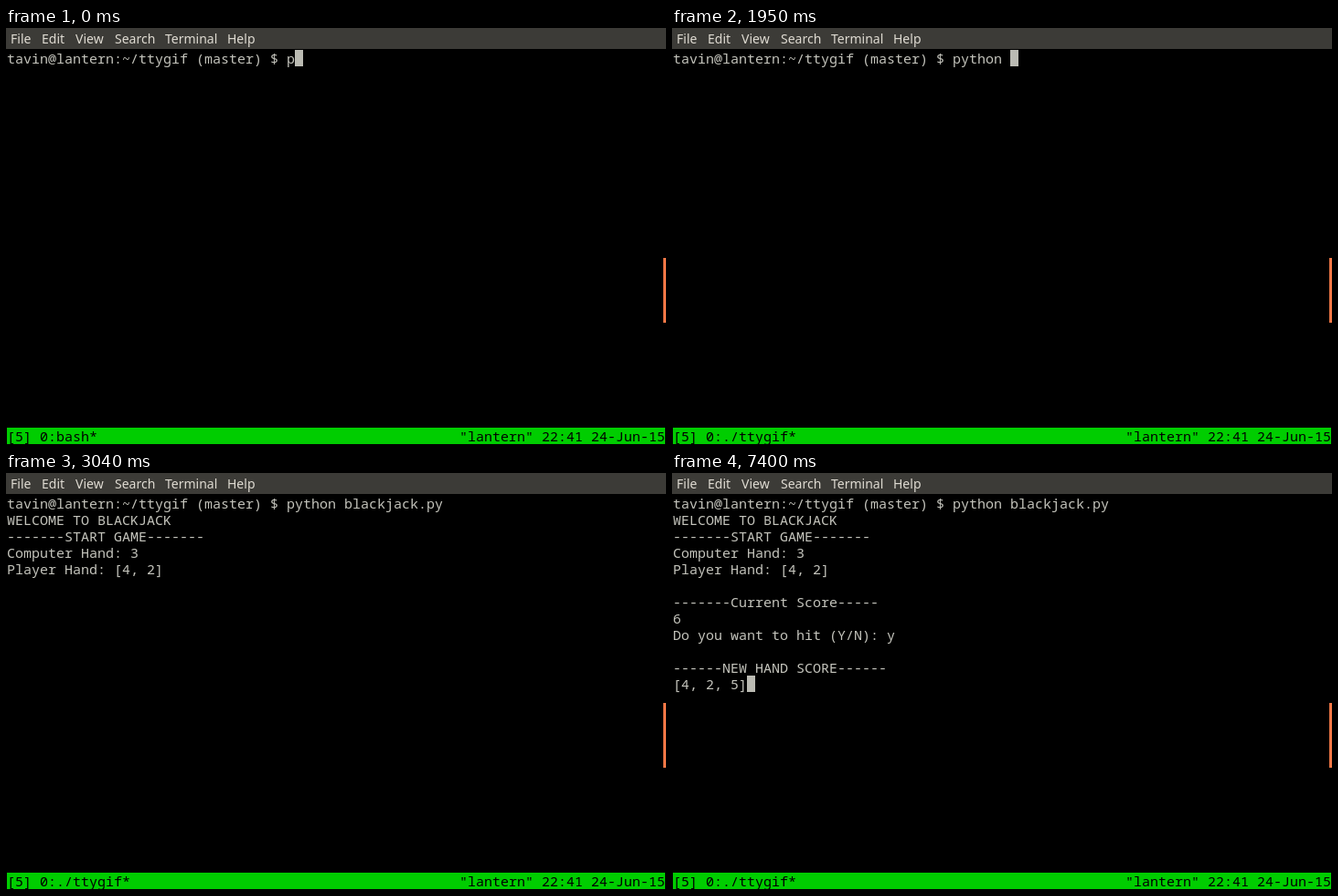
An HTML page that plays this animation: 722x457 px, repeating every 8000 ms.

```html
<!DOCTYPE html>
<html lang="en">
<head>
<meta charset="utf-8">
<title>Terminal session</title>
<style>
  html, body { margin: 0; width: 100%; height: 100%; overflow: hidden; background: #000; }
  #stage { position: relative; width: 722px; height: 457px; overflow: hidden; background: #000; }
  #stage * { position: absolute; top: 0; margin: 0; white-space: pre; }
  #stage #menu { width: 722px; height: 23px; background: #3c3b37; color: #dfdbd2;
                 font: 14px/23px "Noto Sans", "Open Sans", sans-serif; }
  .mono { font: 15px/18px "Noto Sans Mono", "DejaVu Sans Mono", monospace; }
  #stage #screen { left: 1px; top: 24px; color: #c4c4bc; }
  #stage #cursor { width: 9px; height: 18px; background: #bbbbb3; }
  #stage #status { left: 1px; top: 438px; width: 720px; height: 18px; background: #00cd00; color: #000; }
  #stage #clock { right: 0; }
  #stage #scrollbar { left: 719px; top: 252px; width: 3px; height: 71px; background: #f07746; }
</style>
</head>
<body>
<div id="stage">
  <div id="menu">
    <span style="left:5px">File</span><span style="left:39px">Edit</span>
    <span style="left:76px">View</span><span style="left:119px">Search</span>
    <span style="left:174px">Terminal</span><span style="left:242px">Help</span>
  </div>
  <div id="cursor"></div>
  <pre id="screen" class="mono"></pre>
  <div id="status" class="mono"><span id="task"></span><span id="clock">"lantern" 22:41 24-Jun-15</span></div>
  <div id="scrollbar"></div>
</div>
<script>
const LOOP = 8000;
const CELL = { w: 9, h: 18, left: 1, top: 24 };
const $ = id => document.getElementById(id);

const prompt = 'tavin@lantern:~/ttygif (master) $ ';
const command = prompt + 'python blackjack.py';
const welcome = command + '\nWELCOME TO BLACKJACK';
const deal = welcome + '\n-------START GAME-------\nComputer Hand: 3\nPlayer Hand: [4, 2]';
const ask = deal + '\n\n-------Current Score-----\n6\nDo you want to hit (Y/N): ';
const hit = ask + 'y\n\n------NEW HAND SCORE------\n[4, 2, 5]';

// [start in ms, screen text, cursor hidden]
const steps = [
  [0, prompt + 'p'],
  [230, prompt + 'py'],
  [1080, prompt + 'pyt'],
  [1260, prompt + 'pytho'],
  [1350, prompt + 'python'],
  [1950, prompt + 'python '],
  [2180, prompt + 'python bl'],
  [2280, command, true],
  [2920, command + '\n'],
  [2940, welcome, true],
  [3040, deal, true],
  [3140, ask],
  [6890, ask + 'y'],
  [7300, ask + 'y\n'],
  [7400, hit],
];

function draw(t) {
  const [, text, hidden] = steps.findLast(step => step[0] <= t);
  const lines = text.split('\n');
  const row = lines.length - 1;
  $('screen').textContent = text;
  $('task').textContent = t < 230 ? '[5] 0:bash*' : '[5] 0:./ttygif*';
  const cursor = $('cursor').style;
  cursor.display = hidden ? 'none' : 'block';
  cursor.left = CELL.left + lines[row].length * CELL.w + 'px';
  cursor.top = CELL.top + row * CELL.h + 'px';
}

const start = performance.now();
function tick() {
  draw((performance.now() - start) % LOOP);
  requestAnimationFrame(tick);
}
tick();
</script>
</body>
</html>
```
